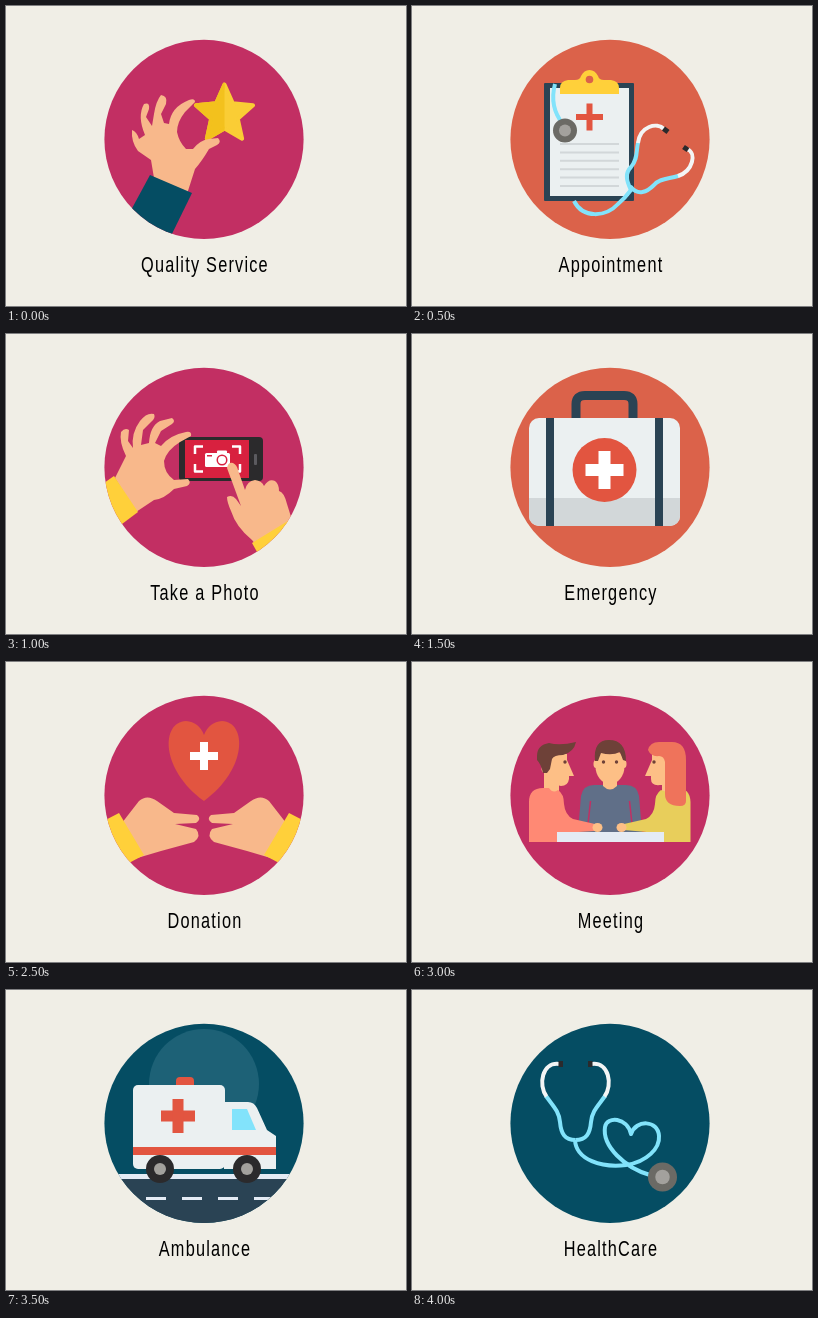
Animation of 400 by 300 pixels, one loop 4.5 s. Source, as an HTML page with a canvas:

```html
<!DOCTYPE html>
<html lang="en">
<head>
<meta charset="utf-8">
<title>Health icons</title>
<style>
html, body { margin: 0; width: 100%; height: 100%; overflow: hidden; background: #f0eee6; }
canvas { display: block; width: 400px; height: 300px; }
</style>
</head>
<body>
<canvas id="stage"></canvas>
<script>
const canvas = document.getElementById('stage');
const ctx = canvas.getContext('2d');
const ratio = window.devicePixelRatio || 1;
canvas.width = 400 * ratio;
canvas.height = 300 * ratio;

const HOLD = 500;
const PAPER = '#f0eee6', CRIMSON = '#c22f63', ORANGE = '#db624a', TEAL = '#054d63';
const SKIN = '#f8b88b', FACE = '#fdbf86', YELLOW = '#ffd03a', CYAN = '#82e3fb';
const WHITE = '#f3f5f5', NAVY = '#2a4354', BLACK = '#2b2a2c', BROWN = '#6e4138';
const DIAL = { x: 198, y: 133.4, r: 99.6 };

function fill(color, d) {
  ctx.fillStyle = color;
  ctx.fill(new Path2D(d));
}

function line(color, width, d, cap = 'round') {
  ctx.strokeStyle = color;
  ctx.lineWidth = width;
  ctx.lineCap = cap;
  ctx.lineJoin = 'round';
  ctx.stroke(new Path2D(d));
}

function box(color, x, y, w, h, r = 0) {
  ctx.fillStyle = color;
  ctx.beginPath();
  ctx.roundRect(x, y, w, h, r);
  ctx.fill();
}

function disc(color, x, y, r, ry = r) {
  ctx.fillStyle = color;
  ctx.beginPath();
  ctx.ellipse(x, y, r, ry, 0, 0, Math.PI * 2);
  ctx.fill();
}

function cross(color, x, y, size, thick) {
  box(color, x - size / 2, y - thick / 2, size, thick);
  box(color, x - thick / 2, y - size / 2, thick, size);
}

// Draws the same part again, flipped about a vertical axis.
function mirrored(axis, draw) {
  draw();
  ctx.save();
  ctx.translate(2 * axis, 0);
  ctx.scale(-1, 1);
  draw();
  ctx.restore();
}

function chestPiece(x, y, r) {
  disc('#6b6a65', x, y, r);
  disc('#a3a19d', x, y, r / 2);
}

function star(x, y, outer, inner) {
  let d = '';
  for (let i = 0; i < 10; i++) {
    const r = i % 2 ? inner : outer;
    const a = i * Math.PI / 5 - Math.PI / 2;
    d += (i ? 'L' : 'M') + (x + r * Math.cos(a)) + ' ' + (y + r * Math.sin(a));
  }
  d += 'Z';
  fill('#facd35', d);
  line('#facd35', 4, d);
  ctx.save();
  ctx.beginPath();
  ctx.rect(x - 40, y - 40, 40, 80);
  ctx.clip();
  fill('#f3c11d', d);
  line('#f3c11d', 4, d);
  ctx.restore();
}

function quality() {
  star(218.5, 108.5, 30, 14);
  fill(SKIN, 'M148 172L145 154L132 145Q125 136 126 124Q131 126 133 133L139 129' +
    'Q131 110 138 98Q144 96 143 103L140 111L146 120L148 108Q150 95 155 89' +
    'Q162 90 160 98L155 108L158 117L163 118Q165 101 183 94Q189 92 189 96' +
    'L179 106Q171 116 171 126Q173 136 180 143L187 143Q194 134 203 133' +
    'L212 132Q216 136 211 139L203 143Q196 155 189 163L181 188Z');
  fill(TEAL, 'M144 169L186 187L163 234L124 206Z');
}

function appointment() {
  box(NAVY, 132, 77, 90, 118, 1);
  box('#ebf0f1', 138, 82, 79, 108);
  cross('#e25540', 177.5, 111, 27, 6);
  for (let i = 0; i < 6; i++) box('#d2d7d9', 148, 137 + i * 8.4, 59, 2);
  fill(YELLOW, 'M148 88V82Q148 75 156 74H163Q168 74 169 70Q172 64 177.5 64' +
    'Q183 64 186 70Q187 74 192 74H199Q207 75 207 82V88Z');
  disc(ORANGE, 177.5, 73.5, 3.8);
  line(CYAN, 4, 'M143 78Q137 101 151 118', 'butt');
  chestPiece(153, 124.5, 12);
  line(CYAN, 4, 'M162 195C171 213 194 211 206 198Q213 192 219 184', 'butt');
  line(CYAN, 4, 'M219 184C214 174 213 167 219 161C226 153 224 145 226 137');
  line(CYAN, 4, 'M219 181C226 190 235 186 242 179C248 172 257 173 266 170');
  line(WHITE, 4, 'M226 137C228 120 245 116 252 123', 'butt');
  line(WHITE, 4, 'M266 170C281 165 285 147 275 143', 'butt');
  line(BLACK, 5, 'M251.5 122.5L256 126', 'butt');
  line(BLACK, 5, 'M276 144L271.5 141', 'butt');
}

function photo() {
  box(BLACK, 173, 103, 84, 44, 4);
  box('#d8213f', 179, 106, 64, 38);
  box('#5b5a5f', 248, 120, 3, 11, 1);
  mirrored(211.5, () => {
    line('#fff', 2.5, 'M189 120V112.5H197M189 130V137.5H197', 'butt');
  });
  box('#fff', 199, 119, 25, 14, 1.5);
  box('#fff', 211, 116.5, 10, 4, 1);
  box('#d8213f', 201, 121, 5, 1.5);
  disc('#d8213f', 216, 126, 5.5);
  disc('#fff', 216, 126, 4);
  fill(SKIN, 'M109 144L120 122Q113 108 115 98Q119 93 123 96L122 107L127 114' +
    'Q125 99 134 87Q141 78 148 80Q150 84 145 88L137 96L135 111L143 109' +
    'Q144 92 154 87L166 84Q170 87 166 90L155 97L149 109L155 112' +
    'Q164 101 180 98Q186 97 185 102L174 108Q161 116 158 127Q158 139 168 146' +
    'L182 145Q186 149 181 152L168 155Q158 165 148 166L130 178Z');
  fill(YELLOW, 'M92 153L108 142L132 178L112 193Z');
  fill(SKIN, 'M221 134Q222 128 227 129Q231 131 232 136L239 156Q241 147 249 146' +
    'Q256 147 258 152Q263 144 269 147Q273 150 273 157Q278 158 281 170' +
    'L286 186L250 211L246 206Q230 193 225 177Q221 168 221 163' +
    'Q226 160 230 165L235 172Z');
  fill(YELLOW, 'M246 209L290 182L292 205L255 225Z');
}

function kit() {
  line(NAVY, 9, 'M164 88V70Q164 61.5 173 61.5H212Q221 61.5 221 70V88', 'butt');
  box('#ebf0f1', 117, 84, 151, 108, 10);
  box('#d2d7d9', 117, 164, 151, 28, [0, 0, 10, 10]);
  box(NAVY, 134, 84, 8, 108);
  box(NAVY, 243, 84, 8, 108);
  disc('#e25540', 192.5, 136, 32);
  cross('#fff', 192.5, 136, 38, 12);
}

function syringe() {
  ctx.translate(202, 130);
  ctx.rotate(-Math.PI / 4);
  fill('#f1eeee', 'M-87 -1Q-80 -2.5 -74 -2H-48V2H-71Q-80 2 -87 -1Z');
  box(TEAL, -49, -5.5, 10, 11);
  box('#5fcbec', -38, -14.5, 38.5, 29);
  box('#eef0f1', 0.5, -14.5, 37, 29);
  box(TEAL, -41, -15.5, 4, 31);
  for (let i = 0; i < 17; i++) box('#18485b', -32 + i * 4, -13.5, 1.3, i % 4 ? 7 : 10);
  box(TEAL, 36.5, -22.5, 5, 45);
  box(TEAL, 41, -2.5, 15, 5);
  box('#3e5468', 54.5, -16, 5.5, 32);
}

function donation() {
  fill('#e25540', 'M198 139C154 107 155 60 180 59Q193 60 198 73Q203 60 216 59' +
    'C241 60 242 107 198 139Z');
  cross('#fff', 198, 94, 28, 8);
  mirrored(198, () => {
    fill(SKIN, 'M112 166L133 139Q141 132 151 139L168 151L191 153Q196 157 190 161' +
      'L169 162L190 167Q196 174 188 180L155 189L128 197Z');
    fill(YELLOW, 'M92 162L113 151L138 193L106 210Z');
  });
}

function leftGuest() {
  box(FACE, 132, 108, 15, 26);
  fill(FACE, 'M134 92H155V98L162 114H157V117Q156 124 149 124Q140 123 134 112Z');
  disc(FACE, 134, 107, 4.5);
  fill(BROWN, 'M125 94Q125 83 137 81Q148 84 164 80Q162 90 151 93Q142 93 140 97' +
    'L138 107L135 111H131Q129 102 125 98Z');
  disc(BROWN, 153, 100, 1.7);
  fill('#ff8974', 'M117 180V140Q117 126 131 126H137Q141 132 146 128Q152 132 152 142' +
    'Q153 153 161 157L183 162V169L150 171V180Z');
  disc(FACE, 185.5, 165.5, 5, 4.5);
}

function rightGuest() {
  box(FACE, 250, 108, 15, 26);
  fill(FACE, 'M240 92H262V123H248Q239 124 239 117V114H233L240 98Z');
  fill('#e8ce5b', 'M278.5 180V140Q278 126 265 126Q257 132 249 128Q243 132 243 142' +
    'Q242 153 234 157L212 162V168L246 171V180Z');
  fill('#ef735b', 'M236 88Q238 80 247 80H260Q274 80 274 98V139Q274 144 268 144' +
    'Q253 144 253 132V100Q252 94 247 94Q239 95 236 88Z');
  disc(BROWN, 242, 100, 1.7);
  disc(FACE, 209.5, 165.5, 5, 4.5);
}

function meeting() {
  fill('#606f88', 'M166 170L169 134Q171 123 182 123H214Q225 123 227 134L230 170Z');
  mirrored(198, () => line(CRIMSON, 1.5, 'M178.5 139L176 162', 'butt'));
  fill(FACE, 'M191 116H205V124Q198 131 191 124Z');
  disc(FACE, 184, 102, 2.5, 4);
  disc(FACE, 212, 102, 2.5, 4);
  disc(FACE, 198, 104, 14.5, 18);
  fill(BROWN, 'M183 99Q181 78 197 78Q214 78 214 99L211 98L208 90Q200 94 189 91L186 99Z');
  disc(BROWN, 191.5, 100, 1.7);
  disc(BROWN, 204.5, 100, 1.7);
  leftGuest();
  rightGuest();
  box('#e4ebf4', 145, 170, 107, 10);
}

function ambulance() {
  disc('#1d6176', 198, 94, 55);
  box('#e4ebf4', 98, 184, 202, 5);
  box(NAVY, 98, 189, 202, 46);
  for (let i = 0; i < 6; i++) box('#e4ebf4', 104 + i * 36, 207, 20, 3);
  box('#e25540', 170, 87, 18, 9, [4, 4, 0, 0]);
  box('#ebf0f1', 127, 95, 92, 84, 5);
  fill('#ebf0f1', 'M218 112H242Q248 112 251 118L261 140L270 146V179H218Z');
  fill(CYAN, 'M226 119H241L250 140H226Z');
  box('#e25540', 127, 157, 143, 8);
  cross('#e25540', 172, 126, 34, 11);
  for (const x of [154, 241]) {
    disc(BLACK, x, 179, 14);
    disc('#a3a19d', x, 179, 6);
  }
}

function healthcare() {
  line(CYAN, 4, 'M163 150C164 170 190 178 214 175C235 172 248 158 247 146' +
    'C246 130 224 129 219 144C215 127 195 126 193 137C190 156 213 178 238 185', 'butt');
  mirrored(163.5, () => {
    line(CYAN, 4, 'M134 106C141 116 147 121 148 132C149 144 153 150 163.5 150', 'butt');
    line(WHITE, 4, 'M147 74C130 72 126 95 134.5 106.5', 'butt');
    line(BLACK, 6, 'M146.5 74H151', 'butt');
  });
  chestPiece(250.5, 187, 14.5);
}

const slides = [
  ['Quality Service', CRIMSON, quality],
  ['Appointment', ORANGE, appointment],
  ['Take a Photo', CRIMSON, photo],
  ['Emergency', ORANGE, kit],
  ['Vaccination', ORANGE, syringe],
  ['Donation', CRIMSON, donation],
  ['Meeting', CRIMSON, meeting],
  ['Ambulance', TEAL, ambulance],
  ['HealthCare', TEAL, healthcare]
];

// One condensed lettering style for every label.
function label(text) {
  ctx.save();
  ctx.translate(198.4, 266);
  ctx.scale(0.74, 1);
  ctx.font = '22px "Liberation Sans", Arial, sans-serif';
  ctx.letterSpacing = '1.65px';
  ctx.textAlign = 'center';
  ctx.fillStyle = '#000';
  ctx.fillText(text, 0.8, 0);
  ctx.restore();
}

function draw(time) {
  const [text, color, icon] = slides[Math.floor(time / HOLD) % slides.length];
  ctx.setTransform(ratio, 0, 0, ratio, 0, 0);
  box(PAPER, 0, 0, 400, 300);
  disc(color, DIAL.x, DIAL.y, DIAL.r);
  ctx.save();
  ctx.beginPath();
  ctx.arc(DIAL.x, DIAL.y, DIAL.r, 0, Math.PI * 2);
  ctx.clip();
  icon();
  ctx.restore();
  label(text);
}

const start = performance.now();
function tick() {
  draw(performance.now() - start);
  requestAnimationFrame(tick);
}
tick();
</script>
</body>
</html>
```
